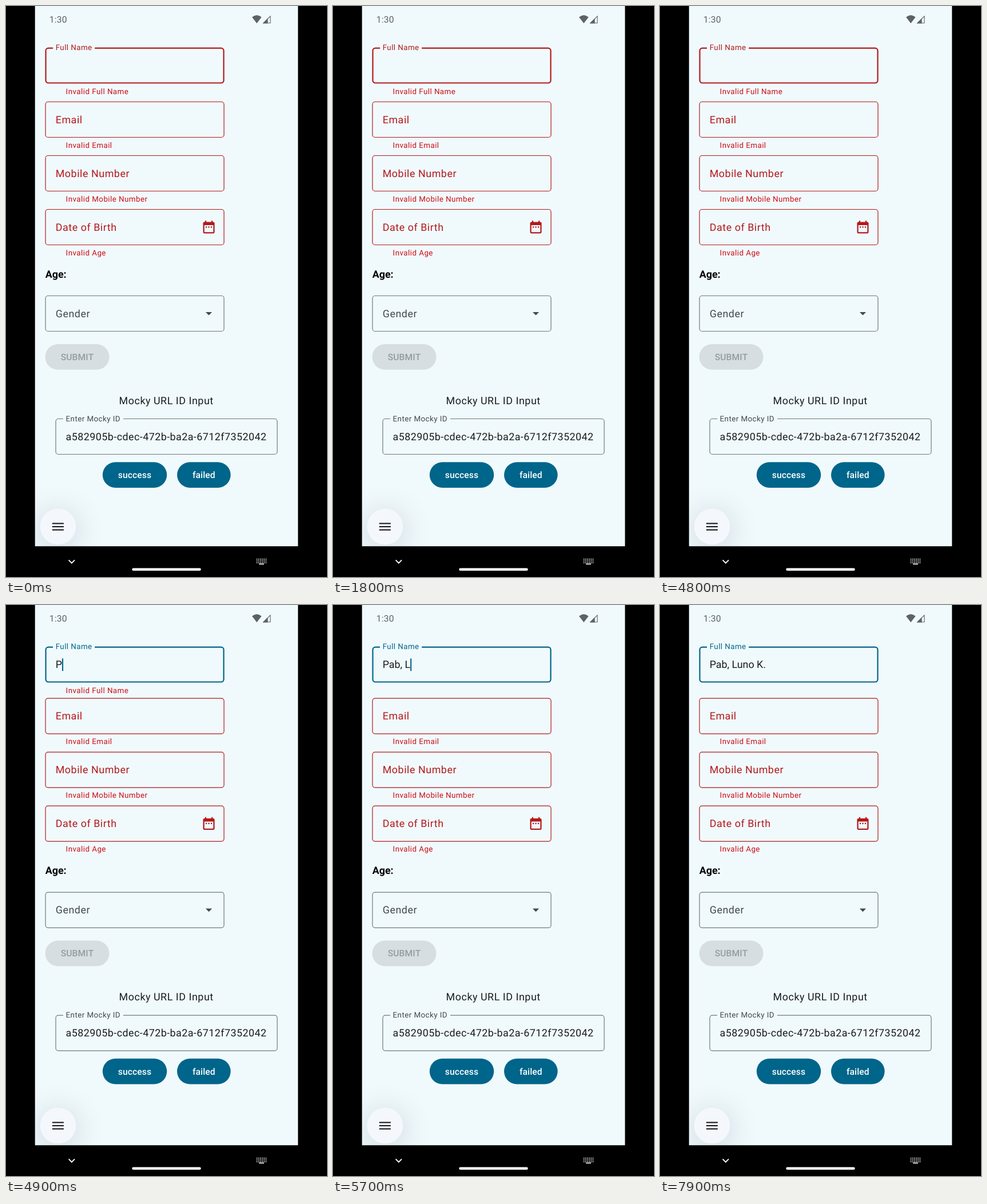
Animation, 561 px wide and 998 px high, one loop 8000 ms. Source, as an HTML page with a canvas:

```html
<!DOCTYPE html>
<html lang="en">
<head>
<meta charset="utf-8">
<title>Form validation</title>
<style>
  html, body { margin: 0; width: 561px; height: 998px; overflow: hidden; background: #000; }
  canvas { display: block; }
</style>
</head>
<body>
<canvas id="stage" width="561" height="998"></canvas>
<script>
const ctx = document.getElementById('stage').getContext('2d');

const LOOP = 8000;
const DP = 1.116;
const BODY = 16 * DP, BUTTON = 14 * DP, SMALL = 12 * DP;
const SCREEN = '#f0fafd', ERROR = '#b3191b', HELPER = '#d00c14';
const PRIMARY = '#00658a', OUTLINE = '#70787d', MUTED = '#41484d', INK = '#191c1e';
const STATUS = '#5e6265';

const FULL_NAME = 'Pab, Luno K.';
// [time, characters typed]
const TYPING = [[4900, 1], [5200, 3], [5300, 4], [5500, 5], [5700, 6], [5800, 7],
  [6100, 8], [6600, 9], [6900, 10], [7100, 11], [7400, 12]];
const CURSOR_TOGGLES = [300, 800, 1200, 1800, 2200, 2800, 3300, 3800, 4300, 4800, 4900, 7900];
const VALID_AT = TYPING[0][0];
const FADE = 150;

const CALENDAR = new Path2D('M9 11H7v2h2v-2zm4 0h-2v2h2v-2zm4 0h-2v2h2v-2zm2-7h-1V2h-2v2H8V2H6v2H5' +
  'c-1.11 0-1.99.9-1.99 2L3 20c0 1.1.89 2 2 2h14c1.1 0 2-.9 2-2V6c0-1.1-.9-2-2-2zm0 16H5V9h14v11z');

ctx.textRendering = 'geometricPrecision';

function text(str, x, y, color, { size = BODY, weight = 400, spacing = 0.56, align = 'left' } = {}) {
  ctx.font = `${weight} ${size}px Roboto, sans-serif`;
  ctx.letterSpacing = spacing + 'px';
  ctx.textAlign = align;
  ctx.fillStyle = color;
  ctx.fillText(str, x, y);
}

function rounded(x, y, w, h, r) {
  ctx.beginPath();
  ctx.roundRect(x, y, w, h, r);
}

function screenPath() {
  ctx.beginPath();
  ctx.rect(50.7, 0, 459.6, 944.3);
}

function polygon(color, ...points) {
  ctx.beginPath();
  points.forEach(([x, y]) => ctx.lineTo(x, y));
  ctx.closePath();
  ctx.fillStyle = color;
  ctx.fill();
}

function outline(x, y, w, h, color, line = 1.2) {
  rounded(x, y, w, h, 4.5);
  ctx.strokeStyle = color;
  ctx.lineWidth = line;
  ctx.stroke();
}

function floatingLabel(str, x, y, gap, color) {
  ctx.fillStyle = SCREEN;
  ctx.fillRect(x - 4.6, y - 4, gap, 8);
  text(str, x, y + 4.8, color, { size: SMALL, spacing: 0.42 });
}

function helper(str, boxTop) {
  text(str, 104.6, boxTop + 86.2, HELPER, { size: SMALL, spacing: 0.446 });
}

function pill(str, x, y, w, fill, color) {
  rounded(x, y, w, 44.7, 22.35);
  ctx.fillStyle = fill;
  ctx.fill();
  text(str, x + w / 2, y + 27.8, color, { size: BUTTON, weight: 500, spacing: 0.11, align: 'center' });
}

function statusBar() {
  text('1:30', 75.7, 29.2, STATUS, { size: BUTTON, spacing: 0.2 });
  ctx.fillStyle = STATUS;
  ctx.beginPath();
  ctx.moveTo(438.3, 30.3);
  ctx.lineTo(430, 19.6);
  ctx.quadraticCurveTo(438.3, 12.6, 446.6, 19.6);
  ctx.fill();
  polygon(STATUS, [448.6, 30.4], [457.6, 30.4], [457.6, 21.4]);
  ctx.beginPath();
  ctx.moveTo(450, 29.8);
  ctx.lineTo(462, 29.8);
  ctx.lineTo(462, 17.8);
  ctx.closePath();
  ctx.strokeStyle = STATUS;
  ctx.lineWidth = 1.1;
  ctx.stroke();
}

function nameField(t, valid) {
  const color = valid ? PRIMARY : ERROR;
  outline(69.5, 73.6, 311, 60.9, color, 2.2);
  floatingLabel('Full Name', 86.7, 72.6, 73, color);

  const typed = TYPING.reduce((n, [at, count]) => t >= at ? count : n, 0);
  const value = FULL_NAME.slice(0, typed);
  text(value, 86.7, 110.4, INK, { spacing: 0 });
  if (CURSOR_TOGGLES.filter(at => t >= at).length % 2) {
    ctx.fillStyle = color;
    ctx.fillRect(86.7 + ctx.measureText(value).width, 93.5, 2.1, 21.8);
  }

  const fade = Math.max(0, Math.min(1, 1 - (t - VALID_AT) / FADE));
  if (fade > 0) {
    ctx.globalAlpha = fade;
    helper('Invalid Full Name', 67.5);
    ctx.globalAlpha = 1;
  }
}

function lowerForm() {
  [['Email', 'Invalid Email'], ['Mobile Number', 'Invalid Mobile Number'], ['Date of Birth', 'Invalid Age']]
    .forEach(([label, message], i) => {
      const top = 167.5 + i * 94;
      outline(69, top, 312, 62, ERROR);
      text(label, 86.7, top + 37.2, ERROR);
      helper(message, top - 6);
    });

  ctx.save();
  ctx.translate(341.1, 373);
  ctx.scale(DP, DP);
  ctx.fillStyle = ERROR;
  ctx.fill(CALENDAR);
  ctx.restore();

  text('Age:', 68.7, 474.8, '#000', { weight: 700, spacing: 0 });

  outline(69, 506.5, 312, 62, OUTLINE);
  text('Gender', 86.7, 543.8, MUTED);
  polygon(MUTED, [348.9, 535], [360.1, 535], [354.5, 540.6]);

  pill('SUBMIT', 68.5, 591, 112, '#d7dee1', '#959b9f');

  text('Mocky URL ID Input', 197.6, 695.8, INK);
  outline(87, 721.5, 387, 62, OUTLINE);
  floatingLabel('Enter Mocky ID', 104.6, 721, 105, MUTED);
  text('a582905b-cdec-472b-ba2a-6712f7352042', 104.6, 758.8, INK, { spacing: 0.47 });

  pill('success', 168.8, 797.2, 112.4, PRIMARY, '#fff');
  pill('failed', 299, 797.2, 93.6, PRIMARY, '#fff');
}

function menuButton() {
  ctx.save();
  screenPath();
  ctx.clip();
  ctx.beginPath();
  ctx.arc(91, 910, 31.3, 0, Math.PI * 2);
  ctx.fillStyle = '#f4f8fd';
  ctx.shadowColor = 'rgba(0, 20, 30, 0.17)';
  ctx.shadowBlur = 54;
  ctx.shadowOffsetY = 7;
  ctx.fill();
  ctx.restore();
  ctx.fillStyle = INK;
  for (let i = -1; i <= 1; i++) ctx.fillRect(80.8, 909 + i * 5.58, 20.1, 2.1);
}

function navigationBar() {
  ctx.strokeStyle = '#fff';
  ctx.lineWidth = 1.9;
  ctx.beginPath();
  ctx.moveTo(109.6, 968.4);
  ctx.lineTo(114.8, 973.6);
  ctx.lineTo(120, 968.4);
  ctx.stroke();

  ctx.fillStyle = '#fff';
  rounded(220.3, 982.4, 120.4, 4.5, 2.25);
  ctx.fill();

  for (let row = 0; row < 3; row++)
    for (let col = 0; col < 6; col++)
      ctx.fillRect(437.8 + col * 3.15, 966 + row * 3.1, 1.6, 1.6);
  ctx.fillRect(442, 974.6, 9, 1.6);
}

function draw(t) {
  const valid = t >= VALID_AT;
  ctx.fillStyle = '#000';
  ctx.fillRect(0, 0, 561, 998);
  ctx.fillStyle = SCREEN;
  screenPath();
  ctx.fill();
  statusBar();
  nameField(t, valid);
  ctx.save();
  ctx.translate(0, valid ? -4.46 : 0);
  lowerForm();
  ctx.restore();
  menuButton();
  navigationBar();
}

const start = performance.now();
function tick() {
  draw((performance.now() - start) % LOOP);
  requestAnimationFrame(tick);
}
tick();
</script>
</body>
</html>
```
